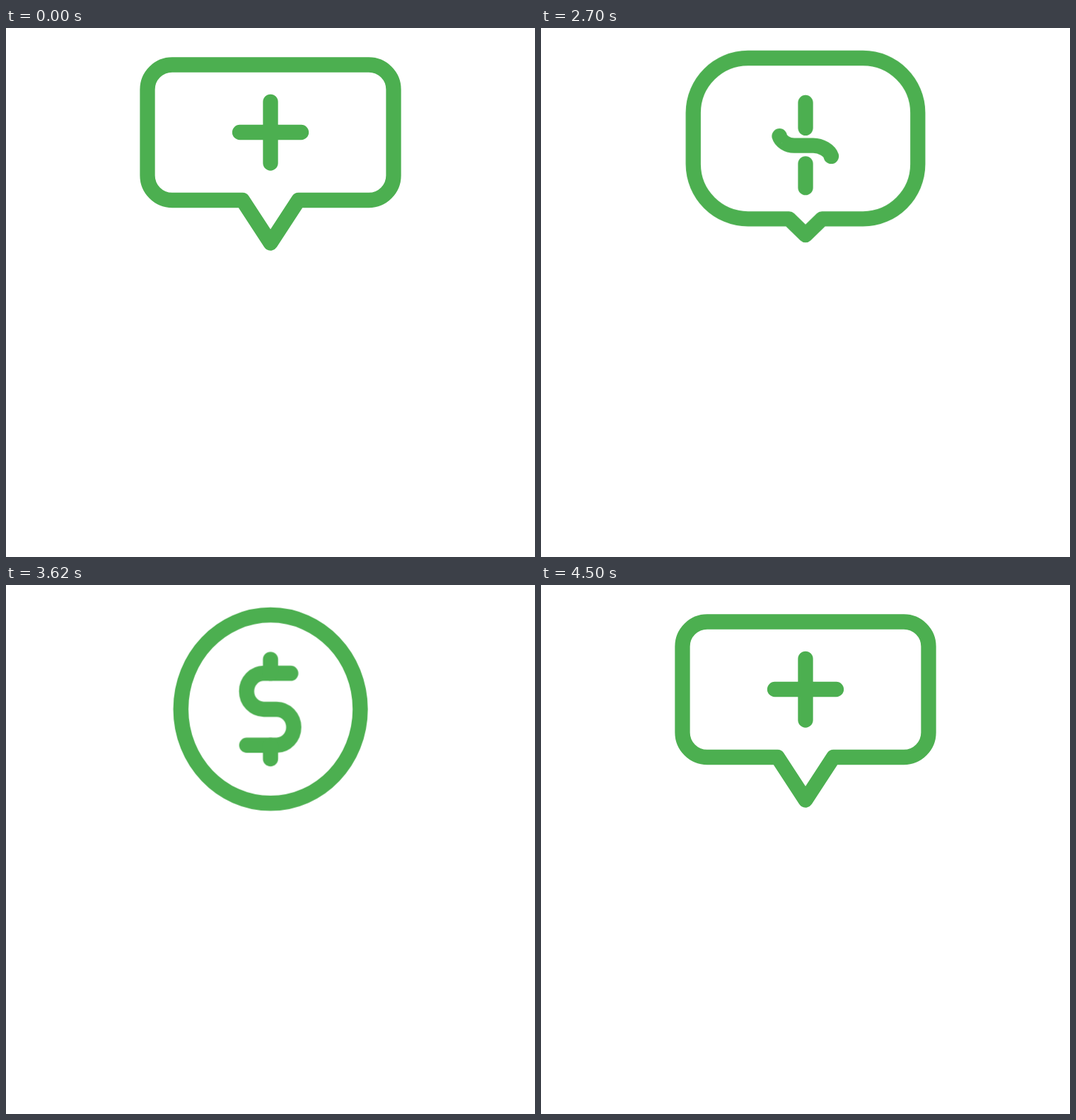
Write an HTML page without scripts that moves like this. It is 748 px wide and 748 px high and loops after 4.52 s.

```html
<!DOCTYPE html>
<html lang="en">
<head>
<meta charset="utf-8">
<title>Bubble to coin</title>
<style>
  :root {
    --bubble: path("M0 52h139c19.3 0 35 15.7 35 35v121.5c0 19.3-15.7 35-35 35h-99.5l-39.5 60.5-39.5-60.5h-99.5c-19.3 0-35-15.7-35-35v-121.5c0-19.3 15.7-35 35-35z");
    --bubble-edge: path("M0 52h8.3c1.2 0 2.1 15.7 2.1 35v121.5c0 19.3-.9 35-2.1 35h-5.9l-2.4 60.5-2.4-60.5h-5.9c-1.2 0-2.1-15.7-2.1-35v-121.5c0-19.3 .9-35 2.1-35z");
    --half-coin: path("M0 42.5h82c42.5 0 77 34.5 77 77v73c0 42.5-34.5 77-77 77h-58.5l-23.5 23-23.5-23h-58.5c-42.5 0-77-34.5-77-77v-73c0-42.5 34.5-77 77-77z");
    --coin: path("M0 43.5h0c72.9 0 132 59.1 132 132v0c0 72.9-59.1 132-132 132h0l0 0 0 0h0c-72.9 0-132-59.1-132-132v0c0-72.9 59.1-132 132-132z");
    --coin-edge: path("M0 43.5h0c8.2 0 14.8 59.1 14.8 132v0c0 72.9-6.6 132-14.8 132h0l0 0 0 0h0c-8.2 0-14.8-59.1-14.8-132v0c0-72.9 6.6-132 14.8-132z");

    --bar: path("M-43.5 147.5l0 0c0 0 0 0 0 0c11 0 22 0 33.5 0l20 0c11 0 22 0 33.5 0c0 0 0 0 0 0l0 0");
    --bar-edge: path("M-2.6 147.5l0 0c0 0 0 0 0 0c.7 0 1.3 0 2 0l1.2 0c.7 0 1.3 0 2 0c0 0 0 0 0 0l0 0");
    --wave: path("M-37 153l0 0c0 0 0 0 0 0c2 7 11 13 21 13l27 0c11 0 23 7 25.5 15c0 0 0 0 0 0l0 0");
    --hook: path("M-10 122l0 0c-13.9 0-25.2 11.3-25.2 25.2c0 13.9 11.3 25.2 25.2 25.2l19 0c13.9 0 25.2 11.3 25.2 25.2c0 13.9-11.3 25.2-25.2 25.2l0 0");
    --ess: path("M29.8 125.3l-39.8 0c-13.9 0-25.2 11.3-25.2 25.2c0 13.9 11.3 25.2 25.2 25.2l19 0c13.9 0 25.2 11.3 25.2 25.2c0 13.9-11.3 25.2-25.2 25.2l-44 0");
    --ess-edge: path("M3.3 125.3l-4.4 0c-1.5 0-2.8 11.3-2.8 25.2c0 13.9 1.3 25.2 2.8 25.2l2.1 0c1.5 0 2.8 11.3 2.8 25.2c0 13.9-1.3 25.2-2.8 25.2l-4.8 0");

    --stem: path("M0 104.3v43.2M0 147.5v43.5");
    --stem-split: path("M0 105.5v36M0 191.5v34");
    --stem-ends: path("M0 105.8v19.5M0 226v19.2");

    --dip: cubic-bezier(.3, .4, .6, 1);
    --pop: cubic-bezier(.3, 0, .5, 1);
    --turn-away: cubic-bezier(.47, 0, .745, .715);
    --turn-back: cubic-bezier(.39, .575, .565, 1);
  }

  html, body { margin: 0; width: 100%; height: 100%; overflow: hidden; background: #fff; }
  svg { display: block; width: 100%; height: 100%; }

  g, path { animation: 4520ms linear infinite; }
  path {
    fill: none;
    stroke: #4caf50;
    stroke-width: 21.3;
    stroke-linecap: round;
    stroke-linejoin: round;
  }

  .bubble-pop { transform-origin: 374px 304px; animation-name: bubble-pop; }
  .coin-pop { transform-origin: 374px 175.5px; animation-name: coin-pop; }
  .sign { transform-origin: 0 147.5px; animation-name: tilt; }
  .shell { d: var(--bubble); animation-name: shell; }
  .stroke { d: var(--bar); animation-name: stroke; }
  .stem { d: var(--stem); animation-name: stem; }

  @keyframes bubble-pop {
    0%, 44.25% { transform: scale(1); animation-timing-function: var(--dip); }
    46.9% { transform: scale(.925); animation-timing-function: var(--pop); }
    55.31% { transform: scale(1.073); animation-timing-function: ease-in-out; }
    59.73%, 100% { transform: scale(1); }
  }
  @keyframes tilt {
    0%, 44.25% { transform: rotate(0deg); animation-timing-function: var(--dip); }
    46.9% { transform: rotate(6deg); animation-timing-function: var(--pop); }
    55.31% { transform: rotate(-7.6deg); animation-timing-function: ease-in-out; }
    59.73%, 100% { transform: rotate(0deg); }
  }
  @keyframes coin-pop {
    0%, 59.73% { transform: scale(1); }
    65.27%, 66.37% { transform: scale(.985); animation-timing-function: var(--dip); }
    69.03% { transform: scale(.92); animation-timing-function: var(--pop); }
    77.43% { transform: scale(1.04); animation-timing-function: ease-in-out; }
    80.75% { transform: scale(1.006); }
    86.28% { transform: scale(.986); }
    88.5%, 100% { transform: scale(1); }
  }
  @keyframes shell {
    0%, 55.31% { d: var(--bubble); animation-timing-function: ease-in; }
    59.73% { d: var(--half-coin); animation-timing-function: ease-out; }
    65.27%, 79.65% { d: var(--coin); animation-timing-function: var(--turn-away); }
    86.28% { d: var(--coin-edge); }
    86.84% { d: var(--bubble-edge); animation-timing-function: var(--turn-back); }
    99.56%, 100% { d: var(--bubble); }
  }
  @keyframes stroke {
    0%, 55.31% { d: var(--bar); animation-timing-function: ease-in; }
    59.73% { d: var(--wave); }
    62.17% { d: var(--hook); animation-timing-function: ease-out; }
    65.27%, 79.65% { d: var(--ess); animation-timing-function: var(--turn-away); }
    86.28% { d: var(--ess-edge); }
    86.84% { d: var(--bar-edge); animation-timing-function: var(--turn-back); }
    99.56%, 100% { d: var(--bar); }
  }
  @keyframes stem {
    0%, 55.31% { d: var(--stem); animation-timing-function: ease-in; }
    59.73% { d: var(--stem-split); animation-timing-function: ease-out; }
    65.27%, 86.28% { d: var(--stem-ends); }
    86.84%, 100% { d: var(--stem); }
  }
</style>
</head>
<body>
<svg viewBox="0 0 748 748">
  <g class="coin-pop">
    <g class="bubble-pop">
      <svg x="374" width="748" height="748" overflow="visible">
        <path class="shell"/>
        <g class="sign">
          <path class="stroke"/>
          <path class="stem"/>
        </g>
      </svg>
    </g>
  </g>
</svg>
</body>
</html>
```
